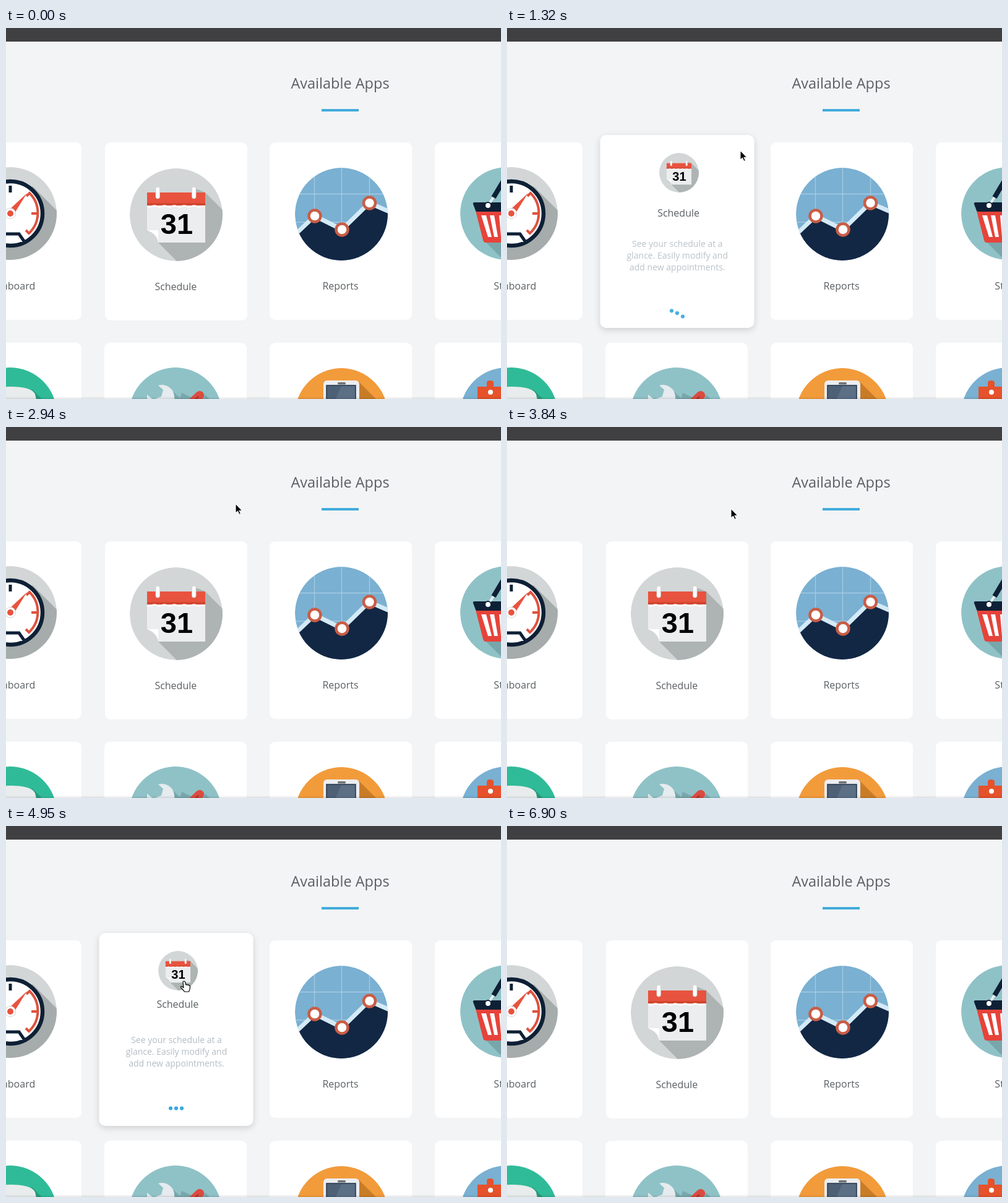
Recreate the animation shown at these times as an HTML page. Size 800 by 600 pixels, loop 6.93 s.

```html
<!DOCTYPE html>
<html lang="en">
<head>
<meta charset="utf-8">
<title>Available Apps</title>
<style>
html, body { margin: 0; width: 100%; height: 100%; overflow: hidden; background: #f3f4f6; }
svg { display: block; width: 800px; height: 600px; }
text { font-family: "Open Sans", "Noto Sans", sans-serif; text-anchor: middle; fill: #5b6064; }
.label { font-size: 16px; }
#about text { font-size: 14px; fill: #b3bdc4; }
#dots { fill: #38a8de; }
.navy { fill: #0e2035; }
.red { fill: #e8533f; }
</style>
</head>
<body>
<svg viewBox="0 0 800 600">
  <defs>
    <clipPath id="disc"><circle r="75"/></clipPath>
    <linearGradient id="fade" x2="0" y2="1">
      <stop stop-opacity="0"/><stop offset="1" stop-opacity=".1"/>
    </linearGradient>
  </defs>
  <rect width="800" height="600" fill="#f3f4f6"/>
  <rect width="800" height="22" fill="#404042"/>
  <text x="540" y="98" font-size="23.5">Available Apps</text>
  <rect x="510" y="131" width="60" height="4" fill="#41abdb"/>
  <g id="cards" fill="#fff"></g>

  <!-- dashboard -->
  <g transform="translate(7 300)"><g clip-path="url(#disc)">
    <circle r="75" fill="#d3d6d7"/>
    <path d="M36-44L90 10V90H-20L-50 30Z" fill="#a6acab"/>
    <circle r="52" fill="#fff" stroke="#0e2035" stroke-width="6.5"/>
    <path d="M-23 46L-14 33H14L23 46" fill="#fff" stroke="#0e2035" stroke-width="5"/>
    <path d="M26-28L31-33A45 45 0 0 1 30 32L25 27M34 0H45" fill="none" stroke="#de523e" stroke-width="4"/>
    <rect class="navy" x="-2.5" y="-45" width="5" height="11"/>
    <path class="red" d="M-4-4L27-33L4 4Z"/>
    <circle r="8.5" fill="#fff" stroke="#d5d5d5"/>
    <circle class="red" r="5"/>
  </g></g>

  <!-- reports -->
  <g transform="translate(542 301)"><g clip-path="url(#disc)">
    <circle r="75" fill="#7ab0d2"/>
    <path d="M-43.5-75V75M.5-75V75M45.5-75V75M-75-32.5H75M-75 13H75" stroke="#a5cbe1" stroke-width="1.3"/>
    <path d="M-80 41L-43 5L1 27L45-16L80-1V80H-80Z" fill="#122744"/>
    <path d="M-80 38L-43 3L1 25L45-18L80-3" fill="none" stroke="#d4eaf6" stroke-width="7"/>
    <g fill="#fff" stroke="#c95d46" stroke-width="4.5">
      <circle cx="-43" cy="3" r="9.5"/><circle cx="1" cy="25" r="9.5"/><circle cx="45.500" cy="-18" r="9.5"/>
    </g>
  </g></g>

  <!-- store -->
  <g transform="translate(809 300)"><g clip-path="url(#disc)">
    <circle r="75" fill="#8fc2c7"/>
    <path d="M-33 47L0 80H50V-10Z" fill="#79a6aa"/>
    <path d="M-50-4H20V47H-34Q-37 47-38 43Z" fill="#e6433a"/>
    <path d="M-41 3H-33L-24 38H-30ZM-27 3H-20L-14 38H-20ZM-12 3H-5V38H-9Z" fill="#fff"/>
    <path class="navy" d="M-52-18H20V-3H-48Q-50-3-51-7L-54-15Q-55-18-52-18Z"/>
    <path d="M-30-13L-20-28" stroke="#e8eef0" stroke-width="4"/>
    <path d="M-21-26L-5-53" stroke="#0e2035" stroke-width="8"/>
    <circle cx="-30" cy="-13" r="5" fill="#fff" stroke="#0e2035" stroke-width="2"/>
  </g></g>

  <!-- lower row -->
  <g transform="translate(7 624)"><g clip-path="url(#disc)">
    <circle r="75" fill="#30bb98"/>
    <path d="M35-40L90 15V40H0Z" fill="#279b7d"/>
    <path d="M-50-20Q-40-44 0-44Q34-44 40-32L43-18V0H-50Z" fill="#e9ecec"/>
  </g></g>
  <g transform="translate(274 624)"><g clip-path="url(#disc)">
    <circle r="75" fill="#8fc2c7"/>
    <path d="M-4-36L35 0H-20ZM48-31L85 6H30ZM10-34L40-20L20 0H0Z" fill="#79a8ac"/>
    <path d="M-28-46Q-12-50-4-36Q2-22-8-10L-20-6Q-40-4-46-22L-46-31L-36-23L-23-28L-20-39Z" fill="#e5ebee"/>
    <path d="M10-12L34-35Q39-39 44-35Q48-31 45-26L20 0H0Z" fill="#dc4b40"/>
    <path d="M18-9L37-28M24-3L43-22" stroke="#a9362f" stroke-width="2.500"/>
  </g></g>
  <g transform="translate(542 625)"><g clip-path="url(#disc)">
    <circle r="75" fill="#f29b3b"/>
    <path d="M28-53L80-1V20H20Z" fill="#c97c27"/>
    <rect x="-29" y="-55" width="58" height="90" rx="6" fill="#ecedf1"/>
    <rect x="-6" y="-52" width="13" height="3.500" rx="1.500" fill="#6d7076"/>
    <rect x="-24" y="-47" width="47" height="60" fill="#4d6076" stroke="#24364a" stroke-width="1.500"/>
    <path d="M0-46H22V0H-20Z" fill="#5b6f85"/>
  </g></g>
  <g transform="translate(809 624)"><g clip-path="url(#disc)">
    <circle r="75" fill="#7ab0d2"/>
    <path d="M-47-44H-32V-50Q-32-54-27-54Q-21-54-21-50V-44H20V0H-47Z" fill="#e5522b"/>
    <path d="M-47-24H20V0H-47Z" fill="#d74a27"/>
    <circle cx="-26" cy="-35" r="4" fill="#fff"/>
  </g></g>

  <g class="label">
    <text x="6" y="423">Dashboard</text>
    <text x="540.500" y="423">Reports</text>
    <text x="808" y="423">Store</text>
  </g>

  <!-- schedule card -->
  <rect id="panel" x="-115" y="-144" width="230" height="288" rx="9" fill="#fff"/>
  <g id="icon"><g clip-path="url(#disc)">
    <circle r="75" fill="#d2d6d7"/>
    <path d="M32-42L47-36L90 7V90H16L-29 45Z" fill="#adb4b3"/>
    <path d="M-47-20H47V45H-29V25H-47Z" fill="#ecedef"/>
    <path d="M-47 25H-29V45Q-31 31-47 25Z" fill="#fff"/>
    <rect class="red" x="-47" y="-36" width="94" height="19"/>
    <rect x="-47" y="-19" width="94" height="4" fill="#d2462f"/>
    <path d="M-47-13.500q4 2 8 0t8 0t8 0t8 0t8 0t8 0t8 0t8 0t8 0t8 0t8 0h6" fill="none" stroke="#fff" stroke-width="2.500"/>
    <g fill="#fff" stroke="#cfcfcf" stroke-width=".8">
      <rect x="-33" y="-45" width="6.500" height="19" rx="3"/><rect x="25.500" y="-45" width="6.500" height="19" rx="3"/>
    </g>
    <text y="31" x="1" style="font:bold 47px 'Liberation Sans',Arial,sans-serif;fill:#000">31</text>
  </g></g>
  <g id="about">
    <text y="351">See your schedule at a</text>
    <text y="370">glance. Easily modify and</text>
    <text y="389">add new appointments.</text>
  </g>
  <text id="name" class="label">Schedule</text>
  <g id="dots"><circle cx="266" r="3.100"/><circle cx="275" r="3.100"/><circle cx="284" r="3.100"/></g>
  <rect y="596" width="800" height="4" fill="url(#fade)"/>

  <g id="cursor">
    <path id="arrow" d="M0 0V15.500L3.500 12.200L6 17.500L8.500 16.400L6.100 11.300H11Z" fill="#000" stroke="#fff" stroke-width="1.100"/>
    <path id="hand" d="M0 3Q0 1 1.700 1Q3.400 1 3.800 3L4.800 7Q6.500 5.500 7.500 7.300Q9.300 6.200 9.800 8Q11.500 7.500 11.500 10Q11.500 14 9.500 18H2.500Q1 15.500-2.800 12Q-4-10.500 -3.200 9.500Q-2 8.700 1 11.500Z" fill="#fff" stroke="#000" stroke-width="1.200" stroke-linejoin="round"/>
  </g>
</svg>
<script>
const LOOP = 6930, STEP = 30;
const $ = id => document.getElementById(id);
const clamp = v => Math.min(1, Math.max(0, v));

$('cards').innerHTML = [[-108, 185], [426, 185], [693, 185], [-108, 509], [159, 509], [426, 509], [693, 509]]
  .map(([x, y]) => `<rect x="${x}" y="${y}" width="230" height="287" rx="9"/>`).join('');
$('hand').setAttribute('d', 'M0 3Q0 1 1.700 1Q3.400 1 3.800 3L4.800 7Q6.500 5.500 7.500 7.300Q9.300 6.200 9.800 8Q11.500 7.500 11.500 10Q11.500 14 9.500 18H2.500Q1 15.500-2.800 12Q-4 10.500-3.200 9.500Q-2 8.700 1 11.500Z');

function bezier(x1, y1, x2, y2) {
  const at = (a, b, s) => 3 * a * s * (1 - s) ** 2 + 3 * b * s * s * (1 - s) + s ** 3;
  return x => {
    if (x <= 0 || x >= 1) return clamp(x);
    let lo = 0, hi = 1;
    for (let i = 0; i < 20; i++) {
      const mid = (lo + hi) / 2;
      if (at(x1, x2, mid) < x) lo = mid; else hi = mid;
    }
    return at(y1, y2, lo);
  };
}
const ease = bezier(.25, .1, .25, 1);
const easeInOut = bezier(.42, 0, .58, 1);

// Times at which the pointer enters and leaves the card
const hovers = [[1125, 2560], [4104, 5720]];
// Pointer path: time, x, y
const path = [
  [250, 815, 240], [700, 560, 218], [1125, 389, 200], [1320, 377, 198], [2480, 377, 198],
  [2560, 375, 182], [2850, 371, 124], [3800, 371, 124], [4104, 306, 185], [4200, 290, 220],
  [4450, 286, 250], [5500, 286, 250], [5720, 291, 182], [5820, 292, 125], [6100, 292, 121],
  [6510, 292, 121], [6780, 420, -24]
];

function pointer(t) {
  const i = path.findIndex(k => k[0] > t);
  if (i < 1) return null;
  const [a, b] = [path[i - 1], path[i]];
  const p = (t - a[0]) / (b[0] - a[0]);
  return [a[1] + (b[1] - a[1]) * p, a[2] + (b[2] - a[2]) * p];
}

function opening(t, duration, curve = ease, delay = 0) {
  const span = hovers.findLast(h => t >= h[0]);
  if (!span) return 0;
  return t < span[1] ? curve((t - span[0] - delay) / duration) : 1 - ease((t - span[1]) / 300);
}

function draw(t) {
  const card = opening(t, 180, easeInOut);
  const icon = opening(t, 160, easeInOut);
  const text = opening(t, 300);
  const set = (el, name, value) => el.setAttribute(name, value);

  set($('panel'), 'transform', `translate(275 329) scale(${1 + .083 * card})`);
  const shade = .15 * card + .8 * card * (1 - card);
  $('panel').style.filter = card ? `drop-shadow(0 ${3 * card}px ${5 * card}px rgba(0,0,0,${shade}))` : 'none';
  set($('icon'), 'transform', `translate(${275 + 3 * icon} ${302 - 68 * icon}) scale(${1 - .573 * icon})`);
  set($('name'), 'transform', `translate(${274.3 + 3 * text} ${424 - 130 * text})`);
  set($('about'), 'transform', `translate(${273 + 2.5 * text} ${36 * (1 - text)})`);
  set($('about'), 'opacity', text);
  set($('dots'), 'opacity', text);
  [...$('dots').children].forEach((dot, i) =>
    set(dot, 'cy', 466.5 - 10 * opening(t, 300, ease, i * 100)));

  const at = pointer(t);
  $('cursor').style.display = at ? '' : 'none';
  if (!at) return;
  set($('cursor'), 'transform', `translate(${at.map(Math.round)})`);
  const linked = hovers.some(([a, b]) => t > a + 300 && t < b);
  $('hand').style.display = linked ? '' : 'none';
  $('arrow').style.display = linked ? 'none' : '';
}

function tick() {
  const t = performance.now() % LOOP;
  draw(t - t % STEP);
  requestAnimationFrame(tick);
}
tick();
</script>
</body>
</html>
```
